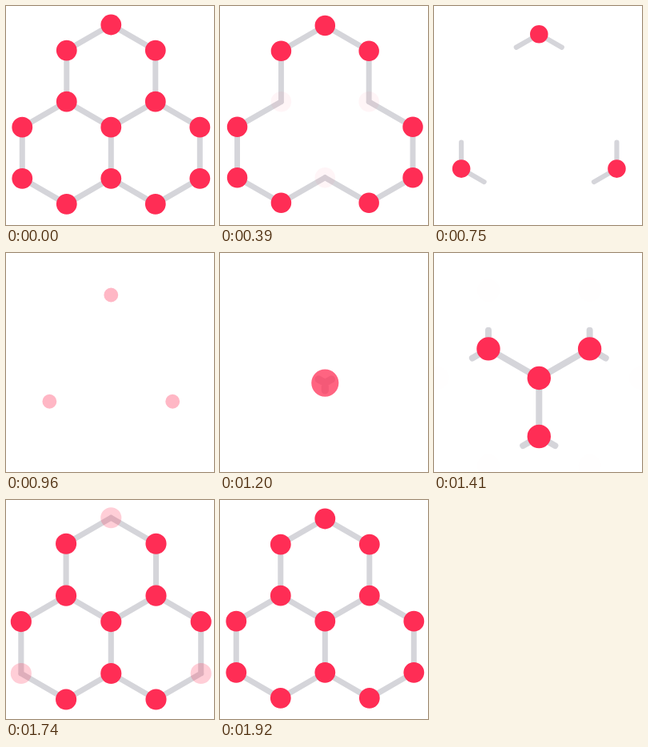
An HTML page with a canvas that plays this animation: 260 by 274 pixels, repeating every 1950 ms.

```html
<!DOCTYPE html>
<html>
<head>
<meta charset="utf-8">
<style>
html, body { margin: 0; width: 100%; height: 100%; overflow: hidden; background: #fff; }
canvas { display: block; width: 260px; height: 274px; }
</style>
</head>
<body>
<canvas id="stage"></canvas>
<script>
const LOOP = 1950, TURN = 1060, FADE = 170;
const SIDE = 64.1, RADIUS = 12.9;
const CENTRE = [131.3, 151.7], PIVOT = [131.3, 118];
const canvas = document.getElementById('stage');
const ctx = canvas.getContext('2d');
const ratio = window.devicePixelRatio || 1;
canvas.width = 260 * ratio;
canvas.height = 274 * ratio;

// Three arms, each bending both ways by 60 degrees per step, close three hexagons.
// A chain holds one point per ring: centre, inner, middle, tip.
const chains = [];
for (let arm = 0; arm < 3; arm++) {
  for (const side of [-1, 1]) {
    const chain = [CENTRE];
    for (let step = 0; step < 3; step++) {
      const angle = Math.PI * (arm * 2 / 3 + side * step / 3 - 1 / 6);
      const [x, y] = chain[step];
      chain.push([x + SIDE * Math.cos(angle), y + SIDE * Math.sin(angle)]);
    }
    chains.push(chain);
  }
}

// Start times of each ring; the gaps widen outwards
const outAt = k => 202 * k + 27 * k * k;
const inAt = k => 1095 + 105 * k + 25 * k * k;

const progress = (t, a, b) => Math.min(1, Math.max(0, (t - a) / (b - a)));
const mix = (a, b, p) => a.map((v, i) => v + (b[i] - v) * p);

function drawLinks(k, from, to) {
  if (from >= to) return;
  ctx.beginPath();
  for (const chain of chains) {
    ctx.moveTo(...mix(chain[k], chain[k + 1], from));
    ctx.lineTo(...mix(chain[k], chain[k + 1], to));
  }
  ctx.stroke();
}

// One path per ring, so points shared by two chains blend only once
function drawRing(k, alpha) {
  ctx.globalAlpha = alpha;
  ctx.beginPath();
  for (const chain of chains) {
    const [x, y] = chain[k];
    ctx.moveTo(x + RADIUS, y);
    ctx.arc(x, y, RADIUS, 0, Math.PI * 2);
  }
  ctx.fill();
}

function draw(t) {
  const leaving = t < TURN;
  const scale = leaving
    ? 1 - 0.306 * (t / 960) ** 3.65
    : 1 + 0.141 * ((LOOP - t) / 540) ** 2.54;

  ctx.setTransform(ratio, 0, 0, ratio, 0, 0);
  ctx.clearRect(0, 0, 260, 274);
  ctx.translate(...PIVOT);
  ctx.scale(scale, scale);
  ctx.translate(-PIVOT[0], -PIVOT[1]);

  ctx.globalAlpha = 1;
  ctx.strokeStyle = '#d5d5da';
  ctx.lineWidth = 7;
  ctx.lineCap = 'round';
  for (let k = 0; k < 3; k++) {
    if (leaving) drawLinks(k, progress(t, outAt(k) + FADE, outAt(k + 1)), 1);
    else drawLinks(k, 0, progress(t, inAt(k + 1) - 40, inAt(k + 1) + 105));
  }

  ctx.fillStyle = '#ff2d55';
  for (let k = 0; k < 4; k++) {
    drawRing(k, leaving
      ? 1 - progress(t, outAt(k), outAt(k) + FADE)
      : progress(t, inAt(k), inAt(k + 1)) ** 1.5);
  }
}

const start = performance.now();
function tick() {
  draw((performance.now() - start) % LOOP);
  requestAnimationFrame(tick);
}
tick();
</script>
</body>
</html>
```
